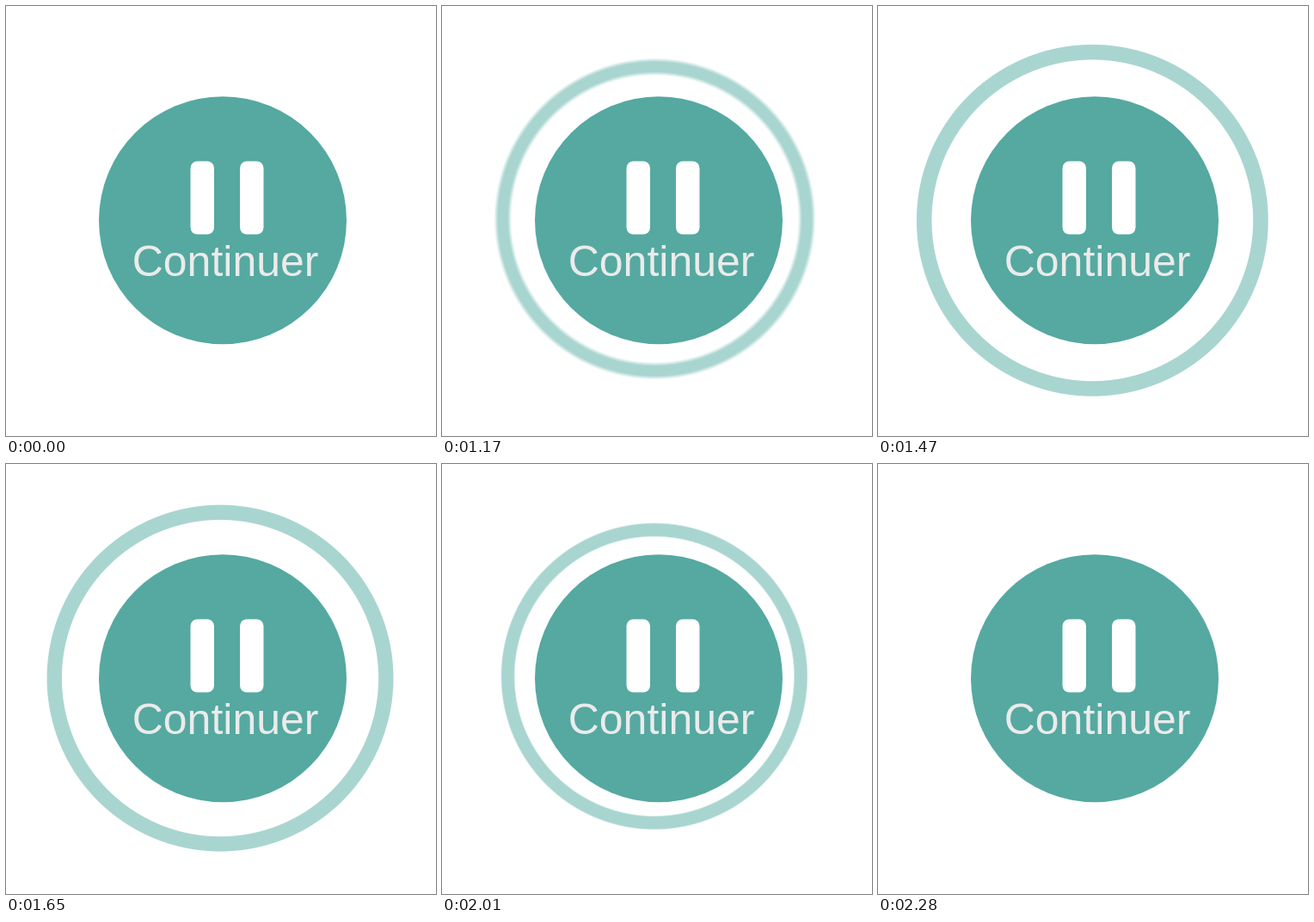
Animation of 500x500 px, one loop 2.7 s. Source, as an HTML page:

```html
<!DOCTYPE html>
<html lang="fr">
<head>
<meta charset="utf-8">
<title>Continuer</title>
<style>
  html, body { margin: 0; width: 100%; height: 100%; overflow: hidden; background: #fff; }
  svg { display: block; width: 500px; height: 500px; }
  text { font: 50px "Liberation Sans", Arial, sans-serif; fill: #ebebeb; }
</style>
</head>
<body>
<svg id="stage" viewBox="0 0 500 500">
  <circle cx="252" cy="249.3" r="144" fill="#55a9a0"/>
  <g fill="#fff">
    <rect x="214.5" y="180.5" width="27.5" height="85" rx="8"/>
    <rect x="272" y="180.5" width="27.5" height="85" rx="8"/>
  </g>
  <text x="146.7" y="314">Continuer</text>
</svg>
<script>
  const LOOP = 2700, STEP = 30, SHUTTER = 15;
  const START = 1080, PEAK = 1350, END = 2280, PEAK_RADIUS = 204.8;
  const INNER = 0.914;
  const stage = document.getElementById('stage');

  // Fast ease-out to the peak, then an accelerating fall back behind the disc.
  function radiusAt(t) {
    if (t < PEAK) return PEAK_RADIUS - 63.8 * ((PEAK - t) / 270) ** 2.85;
    const u = (t - PEAK) / 750;
    return PEAK_RADIUS - 9.5 * u ** 2 - 28.6 * u ** 3;
  }

  // The ring's edges soften with its speed, like motion blur.
  function ring(t) {
    if (t < START || t >= END) return 'none';
    const radius = radiusAt(t);
    const travel = Math.abs(radiusAt(t + SHUTTER / 2) - radiusAt(t - SHUTTER / 2));
    const soft = Math.max(0.5, travel / 2);
    const center = 230.3 + 0.093 * radius;
    const inner = radius * INNER;
    return `radial-gradient(circle at ${center}px ${center}px,
      #a9d5d000 ${inner - soft}px, #a9d5d0 ${inner + soft}px,
      #a9d5d0 ${radius - soft}px, #a9d5d000 ${radius + soft}px)`;
  }

  function draw() {
    const t = performance.now() % LOOP;
    stage.style.backgroundImage = ring(Math.floor(t / STEP) * STEP);
    requestAnimationFrame(draw);
  }
  draw();
</script>
</body>
</html>
```
